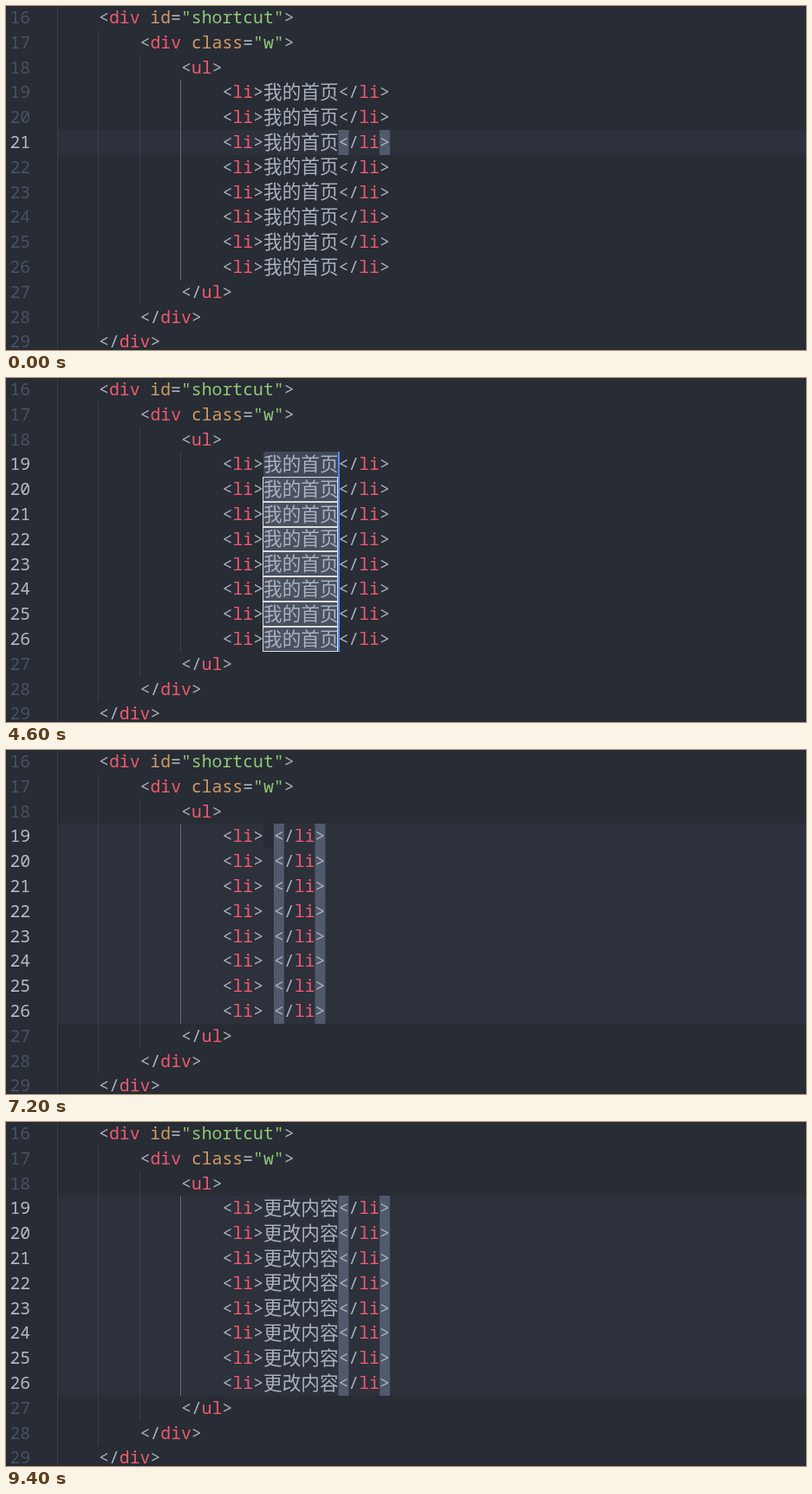
These frames come from a looping animation (923x397 px, 9.8 s). An HTML page:

```html
<!DOCTYPE html>
<html lang="zh">
<head>
<meta charset="utf-8">
<title>Multi-cursor editing</title>
<style>
  html, body { margin: 0; width: 100%; height: 100%; overflow: hidden; background: #282c34; }
  svg { display: block; }
  text { white-space: pre; }
  .code { font: 19.8px "Noto Sans Mono", "DejaVu Sans Mono", monospace; }
  .han { font: 300 21.6px "Noto Sans CJK SC", "Noto Sans CJK", sans-serif; fill: #abb2bf; }
  .pinyin { font: bold 16px "Liberation Sans", sans-serif; fill: #0a5fc8; }
  .num { font: 13.33px "Liberation Mono", monospace; }
  .pick { font: 16px "Noto Sans CJK SC", "Noto Sans CJK", sans-serif; }
</style>
</head>
<body>
<svg id="stage" width="923" height="397" viewBox="0 0 923 397"></svg>
<script>
(() => {
const LOOP = 9800, FIRST = 19, LAST = 26;
const CHAR = 11.88, HAN = 21.6, LEFT = 59.5, ROW = 28.8;
const ITEM_X = LEFT + 20 * CHAR;
const BG = '#282c34', ACTIVE = '#2c313c', CARET = '#528bff';
const GREY = '#abb2bf', RED = '#ef596f', ORANGE = '#d19a66', GREEN = '#90c878';

const SELECT_AT = [3100, 3400, 3700, 3900, 4200, 4400, 4600];
const SELECT_BLINK = [2000, 2500, 2900, 3100, 5000, 5500, 6000, 6400];
const END_BLINK = [8500, 9000, 9400];

// Input steps: start time, committed text, pinyin, candidates
const TYPING = [
  [6600, '', 'g', '个 更 过 给 跟'],
  [6700, '', 'ge', '个 各 哥 歌 格'],
  [6800, '', 'gen', '跟 根 更 亘 艮'],
  [7000, '', "geng'g", '更改 更高 更广 更 耕'],
  [7100, '', "geng'gai", '更改 更该 更 耕 庚'],
  [7200, '', '', ''],
  [7300, '更改', null, ''],
  [7400, '更改', 'n', '你 那 年 能 呢'],
  [7500, '更改', 'ne', '呢 哪 那 讷 呐'],
  [7600, '更改', 'ner', '内容 女儿 呢 那 哪'],
  [7700, '更改', "ner'i", '内人 呢日 内容易 内人员 内热'],
  [7800, '更改', "ner'ion", '内容 呢日欧诺 呢 那 哪'],
  [7900, '更改', "ner'iong", '内容 呢日欧诺个 呢 那 哪'],
  [8000, '更改内容', null, '']
];

const passed = (list, t) => list.filter(at => t >= at).length;
const lit = (list, t) => passed(list, t) % 2 === 0;
const rowTop = n => Math.round((n - 16) * ROW - 1.2);
const base = n => (n - 16) * ROW + 20;
const range = (a, b) => Array.from({ length: b - a + 1 }, (_, i) => a + i);
const items = range(FIRST, LAST);

const rect = (x, y, w, h, fill, more = '') =>
  `<rect x="${x}" y="${y}" width="${w}" height="${h}" fill="${fill}" ${more}/>`;
const rowRect = (n, x, w, fill, more) =>
  rect(x, rowTop(n), w, rowTop(n + 1) - rowTop(n), fill, more);
const label = (x, y, cls, body, fill) =>
  `<text x="${x}" y="${y}" class="${cls}"${fill ? ` fill="${fill}"` : ''}>${body}</text>`;
const esc = s => s.replace(/</g, '&lt;').replace(/>/g, '&gt;');

function code(n, x, ...parts) {
  const spans = parts.map(([s, c]) => `<tspan fill="${c}">${esc(s)}</tspan>`).join('');
  return label(x, base(n), 'code', spans);
}
const openTag = (n, x, tag, attr, value) => code(n, x, ['<', GREY], [tag, RED],
  ...(attr ? [[' ' + attr, ORANGE], ['=', GREY], [`"${value}"`, GREEN]] : []), ['>', GREY]);
const closeTag = (n, x, tag) => code(n, x, ['</', GREY], [tag, RED], ['>', GREY]);
const indent = level => LEFT + level * 4 * CHAR;

function stateAt(t) {
  const s = { active: [], nums: [], brackets: [], carets: [], caretX: 4 * HAN,
              text: '我的首页', selected: 0, guide: true, pinyin: null, picks: '' };
  if (t < 1600) {
    const n = t < 900 ? 21 : t < 1300 ? 20 : 19;
    s.active = s.nums = [n];
    // Bracket marks follow the caret one step late
    s.brackets = t < 1000 ? [21] : t < 1400 ? [20] : [];
    if (n < 21) s.carets = [n];
    if (n === 19) s.caretX = HAN;
  } else if (t < 6600) {
    s.selected = 1 + passed(SELECT_AT, t);
    s.nums = range(FIRST, FIRST + s.selected - 1);
    s.guide = false;
    if (lit(SELECT_BLINK, t)) s.carets = s.nums;
  } else {
    const step = TYPING[passed(TYPING.map(p => p[0]), t) - 1];
    [, s.text, s.pinyin, s.picks] = step;
    s.active = s.nums = s.brackets = items;
    s.caretX = s.text.length * HAN;
    if (s.pinyin === null && lit(END_BLINK, t)) s.carets = items;
  }
  return s;
}

function guides(active) {
  return range(0, 3).map(i => {
    const y = rowTop(16 + i), end = rowTop(30 - i);
    return rect(Math.floor(59 + 47.5 * i), y, 1, end - y, i === 3 && active ? '#696b70' : '#3b4048');
  }).join('');
}

function selection(count) {
  return items.map((n, i) => {
    if (i === 0) return rowRect(n, 297, 87, '#404859', 'rx="3"');
    const y = rowTop(n), h = rowTop(n + 1) - y;
    return rect(296.5, y + .5, 86, h - 1, i < count ? '#4a5160' : '#383b46', 'stroke="#ddd"');
  }).join('');
}

function popup(x, pinyin, picks) {
  const words = picks.split(' ');
  const inner = words.reduce((sum, w) => sum + 16 + 16 * w.length, 0);
  const w = Math.max(321, inner + 137), r = x + w;
  const line = 'stroke="#c3d9ea"';
  let out = rect(x + .5, 112.5, w - 1, 54, '#fff', 'stroke="#c5ccd4"');
  out += rect(x + 1, 139, w - 33, 1, '#d0d4d9');
  out += label(x + 11, 132, 'pinyin', pinyin);
  let at = x + 13;
  words.forEach((word, i) => {
    const fill = i ? '#0b83cd' : '#e01010';
    out += label(at, 159, 'num', `${i + 1}.`, fill) + label(at + 16, 159.5, 'pick', word, fill);
    at += 29 + 16 * word.length;
  });
  out += rect(r - 60.5, 146.5, 28, 14, '#f8fcff', line) + rect(r - 47, 147, 1, 14, '#c3d9ea');
  out += rect(r - 23.5, 146.5, 14, 14, '#f8fcff', line);
  out += `<path d="M${r - 52} 150.5v6l-3-3z" fill="#b5bcc4"/>`;
  out += `<path d="M${r - 41} 150v7l4-3.5z M${r - 20} 152h7l-3.5 4z" fill="#1583cf"/>`;
  return out + rect(r - 30, 114, 28, 28, '#f3a07c');
}

const stage = document.getElementById('stage');

function draw(s) {
  const composing = s.pinyin !== null;
  const endX = ITEM_X + s.text.length * HAN + (composing ? CHAR : 0);
  let out = rect(0, 0, 923, 397, BG);
  out += s.active.map(n => rowRect(n, 60, 863, ACTIVE)).join('');
  out += guides(s.guide);
  if (s.selected) out += selection(s.selected);
  if (composing) out += rowRect(FIRST, endX - CHAR, CHAR, BG);
  out += s.brackets.map(n =>
    [0, 4].map(c => rowRect(n, endX + c * CHAR, CHAR, '#515a6b')).join('')).join('');
  out += range(16, 29).map(n =>
    label(4.5, base(n), 'code', n, s.nums.includes(n) ? '#b4bac6' : '#495162')).join('');

  out += openTag(16, indent(1), 'div', 'id', 'shortcut');
  out += openTag(17, indent(2), 'div', 'class', 'w');
  out += openTag(18, indent(3), 'ul');
  out += items.map(n => openTag(n, indent(4), 'li') +
    label(ITEM_X, base(n) + .6, 'han', s.text) + closeTag(n, endX, 'li')).join('');
  out += closeTag(27, indent(3), 'ul') + closeTag(28, indent(2), 'div') + closeTag(29, indent(1), 'div');

  const caretX = Math.floor(ITEM_X + s.caretX);
  out += s.carets.map(n => rowRect(n, caretX, 2, CARET)).join('');
  if (s.pinyin) out += popup(caretX - 1, s.pinyin, s.picks);
  stage.innerHTML = out;

  const typed = stage.querySelector('.pinyin');
  if (typed) {
    const x = Math.round(+typed.getAttribute('x') + typed.getComputedTextLength()) + .5;
    stage.insertAdjacentHTML('beforeend', `<path d="M${x} 118v17" stroke="#111"/>`);
  }
}

let shown = '';
function tick() {
  const s = stateAt(performance.now() % LOOP), key = JSON.stringify(s);
  if (key !== shown) { shown = key; draw(s); }
  requestAnimationFrame(tick);
}
tick();
})();
</script>
</body>
</html>
```
